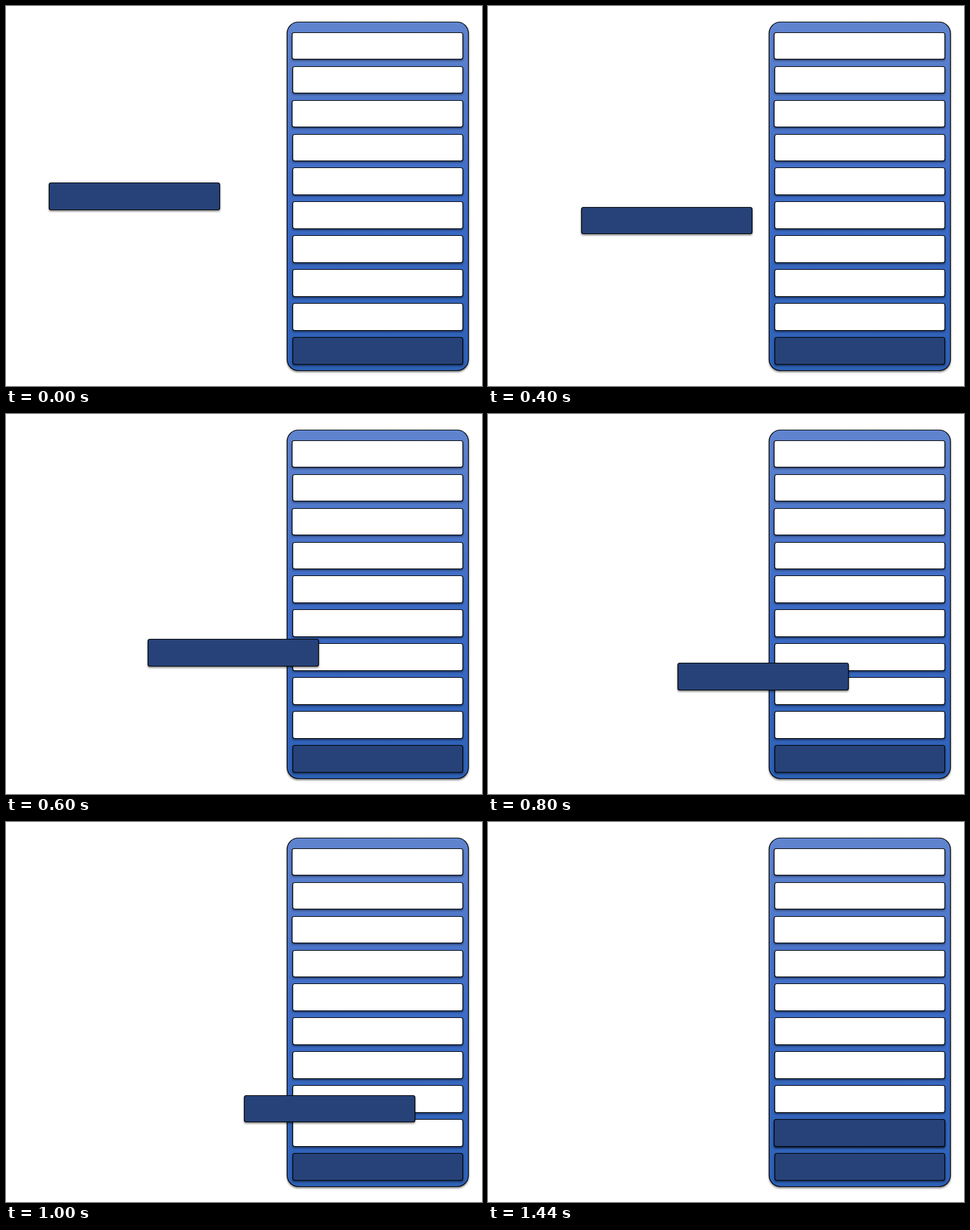
An HTML page that plays this animation: 756x605 px, repeating every 1.6 s.

```html
<!DOCTYPE html>
<html lang="en">
<head>
<meta charset="utf-8">
<title>Stack push</title>
<style>
  html, body { margin: 0; width: 100%; height: 100%; overflow: hidden; background: #fff; }
  svg { display: block; width: 756px; height: 605px; }
  rect { stroke: #000; stroke-width: 1.2; filter: drop-shadow(0 2px 1.5px rgba(0, 0, 0, .5)); }
</style>
</head>
<body>
<svg id="stage" viewBox="0 0 756 605">
  <defs>
    <linearGradient id="blue" x1="0" y1="0" x2="0" y2="1">
      <stop offset="0" stop-color="#6084ce"/>
      <stop offset=".5" stop-color="#3d6bc6"/>
      <stop offset="1" stop-color="#2d61b6"/>
    </linearGradient>
  </defs>
</svg>
<script>
const stage = document.getElementById('stage');
const DARK = '#264278';
const LOOP = 1600;

// Edges are whole pixels; the half pixel keeps the outlines crisp.
function place(rect, left, top, right, bottom) {
  rect.setAttribute('x', left + 0.5);
  rect.setAttribute('y', top + 0.5);
  rect.setAttribute('width', right - left);
  rect.setAttribute('height', bottom - top);
}

function addRect(fill, radius) {
  const rect = document.createElementNS('http://www.w3.org/2000/svg', 'rect');
  rect.setAttribute('fill', fill);
  rect.setAttribute('rx', radius);
  return stage.appendChild(rect);
}

place(addRect('url(#blue)', 18), 446, 25, 734, 580);

for (let row = 0; row < 10; row++) {
  const left = row === 0 || row === 2 ? 454 : 455;
  const top = Math.floor(42.5 + 53.85 * row);
  place(addRect(row === 9 ? DARK : '#fff', 3), left, top, 725, 84 + 54 * row);
}

// Left, top and height of the pushed item at each step.
const path = [
  [68, 281, 43], [148, 320, 42], [225, 358, 43],
  [301, 396, 43], [378, 435, 42], [454, 473, 43]
];
const item = addRect(DARK, 3);

function draw(time) {
  const t = time % LOOP;
  const step = Math.min(5, Math.max(0, Math.floor(t / 200) - 1));
  const [left, top, height] = path[step];
  place(item, left, top, left + 271, top + height);
}

const start = performance.now();
function tick() {
  draw(performance.now() - start);
  requestAnimationFrame(tick);
}
tick();
</script>
</body>
</html>
```
